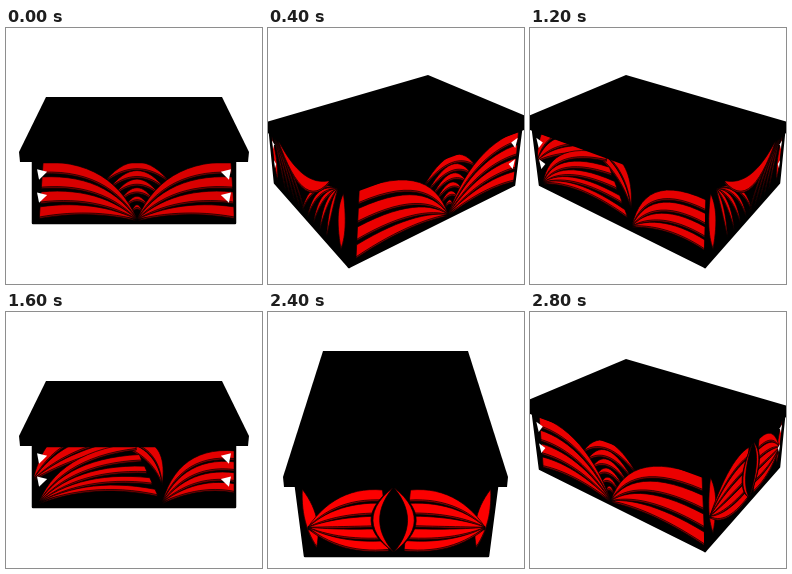
An HTML page with a canvas that plays this animation: 256x256 px, repeating every 3200 ms.

```html
<!DOCTYPE html>
<html lang="en">
<head>
<meta charset="utf-8">
<title>Rotating box</title>
<style>
  html, body { margin: 0; width: 100%; height: 100%; overflow: hidden; background: #fff; }
  canvas { display: block; width: 100vw; height: 100vh; }
</style>
</head>
<body>
<canvas id="stage" width="256" height="256"></canvas>
<script>
const ctx = document.getElementById('stage').getContext('2d');
const STEP = 400, LOOP = 3200, SEGMENTS = 14;

const mix = (a, b, t) => a.map((n, i) => n + (b[i] - n) * t);
const steps = (n, make) => Array.from({ length: n }, (_, i) => make(i));

// Quadratic curve through two ends and one control point.
const curve = (start, control, end) => steps(SEGMENTS + 1, i => {
  const t = i / SEGMENTS;
  return mix(mix(start, control, t), mix(control, end, t), t);
});

// Leaves spread from a root between two outer curves; each curve is [control, tip].
function fan(root, first, last, { count = 1, fill = 1, blunt = 1 } = {}) {
  return steps(count, i => {
    const edge = (bend, reach) => curve(root,
      mix(first[0], last[0], bend / count),
      mix(first[1], last[1], reach / count));
    return [...edge(i, i), ...edge(i + fill, i + fill * blunt).reverse()];
  });
}

const flip = (leaves, axis = 0.5) =>
  leaves.map(leaf => leaf.map(([u, v]) => [2 * axis - u, v]));
const both = (leaves, axis) => [...leaves, ...flip(leaves, axis)];

// Designs use u, v from 0 to 1 across each side of the box.
const arches = steps(6, i => {
  const size = 1 - i * 0.165, base = 0.92 - 0.62 * size, peak = 0.85 * (1 - size);
  const end = side => [0.515 + side * 0.155 * size, base];
  const top = v => [0.515, 2 * v - base];
  return [...curve(end(-1), top(peak), end(1)),
          ...curve(end(1), top(peak + 0.03 + 0.08 * size), end(-1))];
});

const shell = { leaves: [
  ...arches,
  ...both(fan([0.515, 0.94], [[0.64, -0.02], [0.98, 0]], [[0.76, 0.82], [1, 0.98]],
    { count: 4, fill: 0.68 }), 0.515)
] };

const sidePanels = both(fan([0.97, 0.03], [[0.88, 0.4], [0.93, 0.85]], [[1, 0.5], [0.93, 0.85]]));

const fangs = { leaves: [
  ...sidePanels,
  ...both(fan([0.08, 0.03], [[0.38, 0.2], [0.52, 0.92]], [[0.12, 0.35], [0.14, 0.9]],
    { count: 5, fill: 0.75, blunt: 0 })),
  ...fan([0.15, 0], [[0.5, 0.5], [0.85, 0]], [[0.5, 0.95], [0.85, 0]])
] };

const fronds = { leaves: [
  ...fan([0, 0.55], [[0.04, 0.05], [0.1, -0.1]], [[0.2, 0.2], [0.48, 0]], { count: 3, fill: 0.75 }),
  ...fan([0.64, 0.62], [[0.58, 0.1], [0.4, -0.05]], [[0.67, 0.1], [0.6, -0.05]], { count: 2, fill: 0.8 }),
  ...fan([0.03, 0.92], [[0.13, 0.1], [0.5, -0.05]], [[0.32, 0.6], [0.63, 0.9]],
    { count: 5, fill: 0.78, blunt: 0.6 }),
  ...fan([0.64, 0.92], [[0.72, 0], [1, 0.08]], [[0.84, 0.68], [1, 0.8]], { count: 4, fill: 0.7 })
] };

const lidTip = [0.485, 0.94];
const eye = {
  leaves: [
    ...sidePanels,
    ...both(fan([0.035, 0.56], [[0.2, -0.02], [0.43, 0.04]], [[0.2, 1.02], [0.46, 0.94]],
      { count: 5, fill: 0.75 }))
  ],
  pupil: fan([0.485, 0], [[0.25, 0.46], lidTip], [[0.72, 0.46], lidTip]),
  rim: both(fan([0.485, 0], [[0.27, 0.46], lidTip], [[0.34, 0.46], lidTip]), 0.485)
};

const mirror = points => points.map(([x, y]) => [256 - x, y]);
const mirrorQuad = ([tl, tr, br, bl]) => mirror([tr, tl, bl, br]);

// Quads go clockwise from the top left; gaps are [side of box, left or right end].
const longView = {
  lid: [[40, 69], [216, 69], [243, 124], [242, 134], [14, 134], [13, 124]],
  quads: [[[27, 134], [229, 134], [229, 195], [27, 195]]],
  gaps: [[0, 0], [0, 1]]
};
const shortView = {
  lid: [[55, 39], [200, 39], [240, 165], [239, 175], [16, 175], [15, 165]],
  quads: [[[28, 175], [229, 175], [220, 244], [37, 244]]],
  gaps: []
};
const leftView = {
  lid: [[-2, 88], [96, 47], [258, 94], [256, 105], [178, 166], [0, 102]],
  quads: [
    [[3, 102], [177, 166], [175, 239], [10, 157]],
    [[177, 166], [254, 105], [249, 155], [175, 239]]
  ],
  gaps: [[0, 0], [1, 1]]
};
const rightView = {
  lid: mirror(leftView.lid),
  quads: leftView.quads.map(mirrorQuad),
  gaps: [[0, 1], [1, 0]]
};

const poses = [
  { view: longView, faces: [shell], red: 217 },
  { view: rightView, faces: [shell, fangs], red: 235 },
  { view: shortView, faces: [fangs], red: 196 },
  { view: leftView, faces: [fronds, fangs], red: 230 },
  { view: longView, faces: [fronds], red: 228 },
  { view: rightView, faces: [fronds, eye], red: 250 },
  { view: shortView, faces: [eye], red: 252 },
  { view: leftView, faces: [shell, eye], red: 235 }
];

// Perspective map from the unit square to a quad.
function projector([p, q, s, w]) {
  const [ax, ay] = [q[0] - s[0], q[1] - s[1]];
  const [bx, by] = [w[0] - s[0], w[1] - s[1]];
  const [cx, cy] = [p[0] - q[0] + s[0] - w[0], p[1] - q[1] + s[1] - w[1]];
  const det = ax * by - bx * ay;
  const g = (cx * by - bx * cy) / det, h = (ax * cy - cx * ay) / det;
  return ([u, v]) => p.map((n, i) =>
    (n + u * (q[i] - n + g * q[i]) + v * (w[i] - n + h * w[i])) / (1 + g * u + h * v));
}

function shape(points, fill, line = 0) {
  ctx.beginPath();
  points.forEach(point => ctx.lineTo(...point));
  ctx.closePath();
  if (fill) {
    ctx.fillStyle = fill;
    ctx.fill();
  }
  if (line) {
    ctx.lineWidth = line;
    ctx.stroke();
  }
}

function drawFace({ leaves, pupil = [], rim = [] }, quad, red) {
  const project = projector(quad);
  const bright = `rgb(${red},0,0)`, dark = `rgb(${red * 0.6},0,0)`;
  const paint = (leaf, color) => shape(leaf.map(project), color, 0.7);
  const cutThickness = leaf =>
    shape(leaf.map(project).map(([x, y]) => [x, y + 1.6]), dark, 0.7);

  ctx.save();
  shape(quad, '#000');
  ctx.clip();
  leaves.forEach(leaf => {
    cutThickness(leaf);
    paint(leaf, bright);
  });
  pupil.forEach(leaf => paint(leaf, '#000'));
  rim.forEach(leaf => paint(leaf, bright));
  ctx.restore();
}

function drawGaps(quad, end) {
  const project = projector(quad);
  const u = d => end ? 1 - d : d;
  [0.12, 0.5].forEach(v =>
    shape([[u(0.02), v], [u(0.07), v + 0.04], [u(0.03), v + 0.17]].map(project), '#fff'));
}

function draw({ view, faces, red }) {
  ctx.fillStyle = '#fff';
  ctx.fillRect(0, 0, 256, 256);
  ctx.strokeStyle = '#000';
  ctx.lineJoin = 'round';
  faces.forEach((face, i) => drawFace(face, view.quads[i], red));
  view.gaps.forEach(([side, end]) => drawGaps(view.quads[side], end));
  view.quads.forEach(quad => shape(quad, null, 2.5));
  shape(view.lid, '#000');
}

const start = performance.now();
let shown = -1;
function tick() {
  const pose = Math.floor((performance.now() - start) % LOOP / STEP);
  if (pose !== shown) draw(poses[shown = pose]);
  requestAnimationFrame(tick);
}
tick();
</script>
</body>
</html>
```
